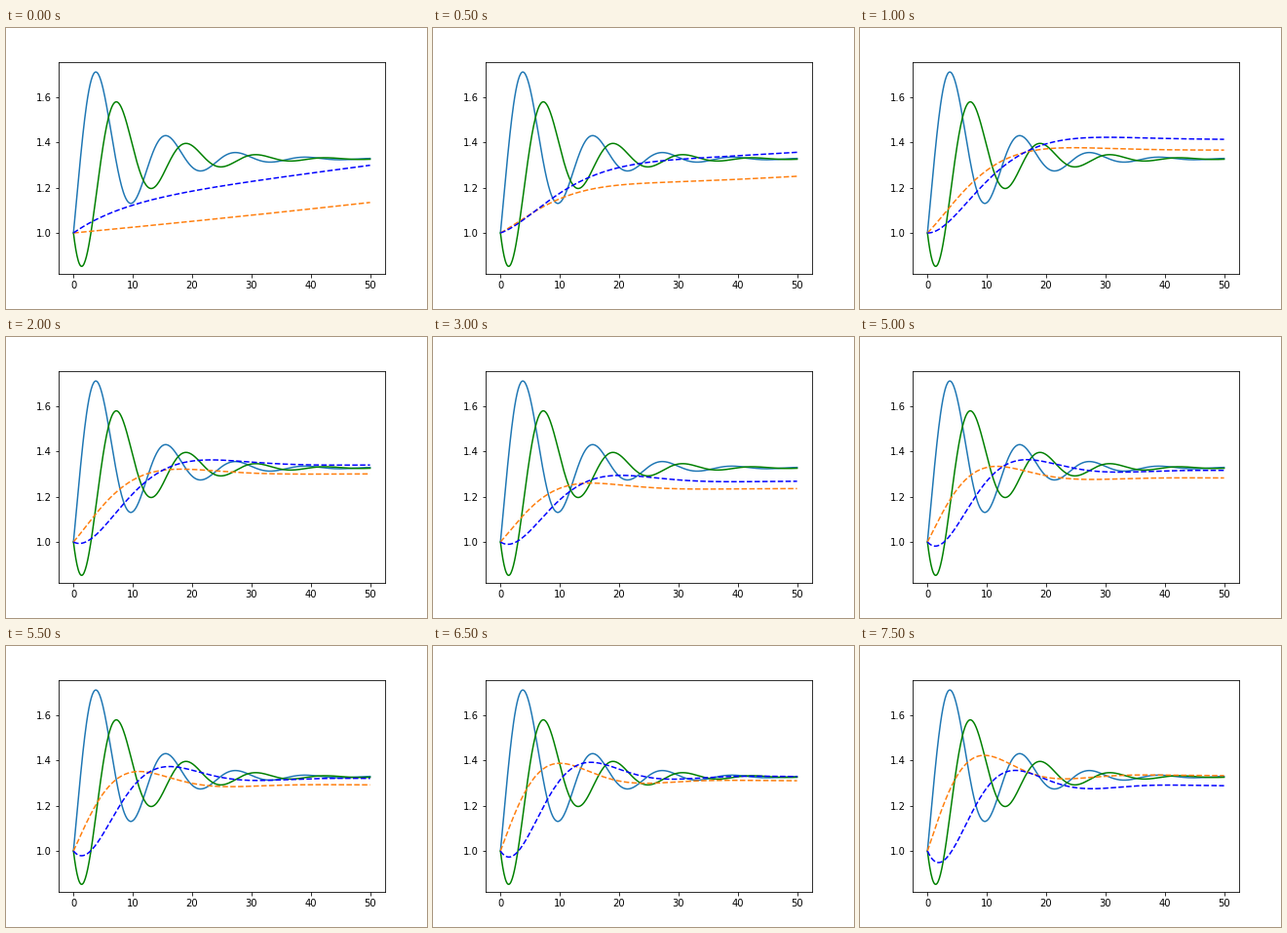
Write a matplotlib script that moves like this. It is 432 px wide and 288 px high and loops after 8 s.

```python
import numpy as np
import matplotlib.pyplot as plt
from matplotlib.animation import FuncAnimation

FRAMES, STEP = 16, 500
t = np.linspace(0, 50, 501)

# Settling levels during training: second, prey, predator
LEVELS = np.array([
    (1.0, 1.367, 1.414),
    (3.0, 1.236, 1.269),
    (4.0, 1.371, 1.342),
    (5.0, 1.283, 1.316),
    (6.5, 1.311, 1.329),
    (7.5, 1.334, 1.289),
])


def damped(level, decay, omega, phase, amp=None):
    """Damped oscillation from 1 to level; a custom amp is eased in."""
    if amp is None:
        amp = (level - 1) / np.cos(phase)
    y = level - amp * np.exp(-decay * t) * np.cos(omega * t + phase)
    return y + (1 - y[0]) * np.exp(-t / 2)


def untrained():
    prey = 1 + 0.0025 * t + 4e-6 * t**2
    predator = 1 + 0.13 * (1 - np.exp(-0.1155 * t)) + 0.0034 * t
    return np.array([prey, predator])


def trained(sec):
    """The fit oscillates faster as training goes on."""
    a, b = (np.interp(sec, LEVELS[:, 0], col) for col in LEVELS.T[1:])
    grow = (sec - 1) ** 0.7
    tilt = 1.9 * (b - a)
    prey = damped(a, 0.132, 0.112 + 0.0321 * grow,
                  -0.58 + 0.29 * grow + tilt)
    predator = damped(b, 0.125, 0.104 + 0.0375 * grow,
                      -0.975 + 0.035 * grow + tilt)
    return np.array([prey, predator])


def fit(sec):
    mix = min(sec, 1)
    return (1 - mix) * untrained() + mix * trained(max(sec, 1))


fig, ax = plt.subplots(figsize=(6, 4), dpi=72)
fig.subplots_adjust(left=0.125, right=0.9, bottom=0.125, top=0.88)
ax.plot(t, damped(1.328, 0.111, 0.535, 0.905, 0.59), color="C0")
ax.plot(t, damped(1.328, 0.111, 0.535, -0.93, 0.574), color="g")
lines = [ax.plot(t, y, "--", color=c)[0]
         for y, c in zip(untrained(), ("C1", "b"))]
ax.set_xlim(-2.5, 52.5)
ax.set_ylim(0.8188, 1.758)
ax.set_xticks(range(0, 51, 10))
ax.set_yticks([1.0, 1.2, 1.4, 1.6])


def update(frame):
    for line, y in zip(lines, fit(frame * STEP / 1000)):
        line.set_ydata(y)
    return lines


anim = FuncAnimation(fig, update, frames=FRAMES, interval=STEP,
                     repeat=True, repeat_delay=0)
plt.show()
```
